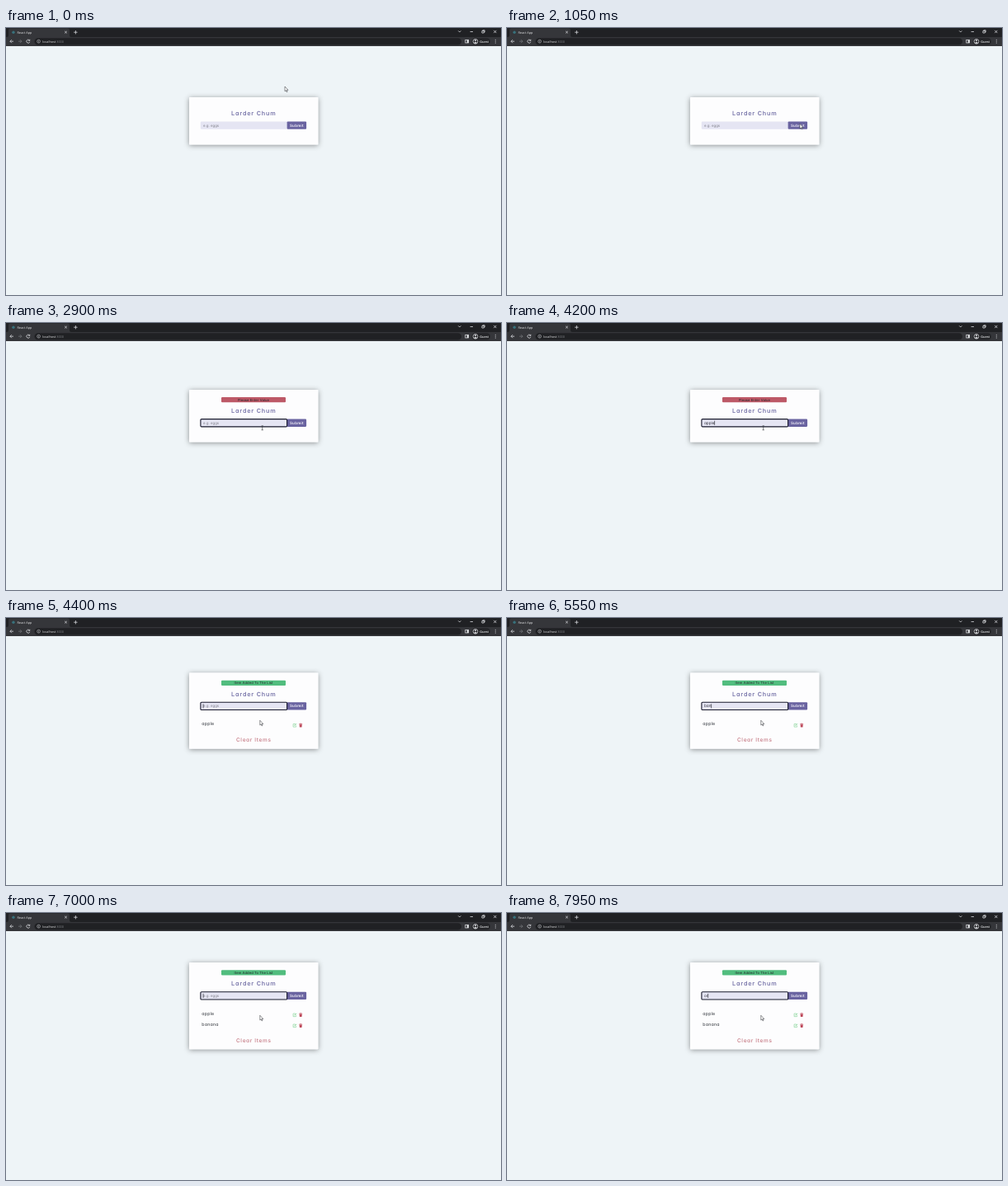
Write an HTML page that moves like this. It is 600 px wide and 324 px high and loops after 8 s.

```html
<!DOCTYPE html>
<html lang="en">
<head>
<meta charset="utf-8">
<title>Grocery list</title>
<style>
  html, body { margin: 0; width: 100%; height: 100%; overflow: hidden; background: #eef4f7; }
  svg { display: block; width: 100vw; height: 100vh; }
  text { font-family: Inter, "Open Sans", sans-serif; font-feature-settings: "cv11"; text-rendering: geometricPrecision; white-space: pre; }
  .chrome text { font-family: "Open Sans", "Noto Sans", sans-serif; font-size: 3.8px; fill: #e4e5e7; }
  .line { fill: none; stroke: #dfe1e4; stroke-width: .75; }
  .mid { text-anchor: middle; }
  .title { font-size: 7.2px; font-weight: 600; letter-spacing: .85px; fill: #7774a9; }
  .notice { font-size: 4.1px; letter-spacing: .1px; fill: #23272b; }
  .submit { font-size: 4.5px; font-weight: 600; letter-spacing: .28px; fill: #f4f3fa; }
  .item { font-size: 5.3px; letter-spacing: .2px; fill: #34383f; }
  .clear { font-size: 6.5px; font-weight: 500; letter-spacing: .65px; fill: #c57984; }
</style>
</head>
<body>
<svg viewBox="0 0 600 324">
  <defs>
    <filter id="shadow" x="-10%" y="-25%" width="120%" height="150%">
      <feDropShadow dx="0" dy="1" stdDeviation="3" flood-color="#000" flood-opacity=".42"/>
    </filter>
    <g id="icons">
      <path d="M351 -1.6H348.1V2H351.6V.3" fill="none" stroke="#9bdcaa" stroke-width=".8"/>
      <path d="M349.5 .7L352 -1.8" stroke="#74cb88" stroke-width=".9"/>
      <path d="M355.2 -1.5H359.2M356.5 -2H357.9" stroke="#bd4759" stroke-width=".7"/>
      <path d="M355.6 -.9H358.8L358.5 2.3H355.9Z" fill="#bd4759"/>
    </g>
  </defs>
  <rect width="600" height="324" fill="#eef4f7"/>

  <g class="chrome">
    <rect width="600" height="12" fill="#202124"/>
    <path d="M1 11Q3 11 3 9V2.5Q3 .5 5 .5H75Q77 .5 77 2.5V9Q77 11 79 11H600V22H0V11Z" fill="#35363a"/>
    <circle cx="9" cy="5.2" r="1.7" fill="#38717c"/>
    <text x="13.5" y="6.7">React App</text>
    <path class="line" d="M71.2 3.8L73.8 6.4M73.8 3.8L71.2 6.4M82.2 5.2H86.6M84.4 3V7.4"/>
    <path class="line" d="M548.2 3.4L549.8 5L551.4 3.4M562.6 4.5H566M591.2 2.9L594.4 6.1M594.4 2.9L591.2 6.1"/>
    <path class="line" d="M576.9 3.6H579.3V6H576.9ZM577.8 3.4V2.7H580.2V5.1H579.5"/>
    <path class="line" d="M9 16.2H4.9M6.9 14.2L4.9 16.2L6.9 18.2"/>
    <path class="line" d="M15 16.2H19M17 14.2L19 16.2L17 18.2" style="stroke:#77797d"/>
    <path class="line" d="M28.4 14.9A2 2 0 1 0 28.8 16.8M28.8 13.8V15.4H27.2"/>
    <rect x="34.5" y="12.2" width="517.5" height="8.4" rx="4.2" fill="#202124"/>
    <circle class="line" cx="39.6" cy="16.2" r="1.9" style="stroke-width:.5"/>
    <path class="line" d="M39.6 15.9V17.3M39.6 15V15.4" style="stroke-width:.5"/>
    <text x="44.3" y="17.7">localhost<tspan fill="#85888c">:3000</tspan></text>
    <rect class="line" x="556.8" y="14.4" width="3.8" height="3.6"/>
    <rect x="558.8" y="14.4" width="2" height="3.6" fill="#dfe1e4"/>
    <rect x="564.5" y="12.2" width="22.5" height="8.4" rx="4.2" fill="#242528"/>
    <circle class="line" cx="569" cy="16.3" r="2.9"/>
    <circle cx="569" cy="15.3" r="1" fill="#dfe1e4"/>
    <path d="M567.1 18Q569 16.1 570.9 18Q569 19.7 567.1 18Z" fill="#dfe1e4"/>
    <text x="574.3" y="17.6" font-weight="600">Guest</text>
    <path d="M593.3 14.3v.01M593.3 16.2v.01M593.3 18.1v.01" stroke="#dfe1e4" stroke-linecap="round"/>
  </g>

  <rect id="card" x="222" width="156.3" rx=".8" fill="#fdfdfe" filter="url(#shadow)"/>
  <g id="notice">
    <rect id="noticeBar" x="261" width="78" height="6.3" y="-3.15" rx="1.1"/>
    <text id="noticeText" class="notice mid" x="300" y="1.45"></text>
  </g>
  <text id="title" class="title mid" x="300.4">Larder Chum</text>
  <g id="form">
    <path d="M340.6 0H237A1.2 1.2 0 0 0 235.8 1.2V8.1A1.2 1.2 0 0 0 237 9.3H340.6Z" fill="#e5e5f3"/>
    <rect x="340.6" width="23.5" height="9.3" rx="1.1" fill="#6963a0"/>
    <text class="submit mid" x="352.4" y="6.2">Submit</text>
    <rect id="focus" x="235.9" y="0" width="104.7" height="9.3" rx="1.1" fill="none" stroke="#17182b" stroke-width="1.1"/>
    <text id="field" x="238.9" y="6.1"></text>
    <path id="caret" d="M0 2.1V7.2" stroke="#22222c" stroke-width=".65"/>
  </g>
  <g id="rows"></g>
  <text id="clear" class="clear mid" x="300.3">Clear Items</text>

  <path id="arrow" d="M0 0V5.8L1.3 4.6L2.2 6.7L3.1 6.3L2.2 4.3H4Z" fill="#fff" stroke="#22252a" stroke-width=".5"/>
  <path id="beam" d="M-1.2 -2.5H1.2M0 -2.5V2.5M-1.2 2.5H1.2" fill="none" stroke="#33363b" stroke-width=".6"/>
</svg>
<script>
const LOOP = 8000, MIDDLE = 112.7;
const EMPTY_AT = 1300, FOCUS_AT = 2300, SUBMITS = [4250, 6700];
const items = ["apple", "banana"];
const entries = [
  { from: 0, text: "apple", keys: [3200, 3450, 3800, 4000, 4150] },
  { from: SUBMITS[0], text: "banana", keys: [5100, 5300, 5450, 5650, 5850, 6000] },
  { from: SUBMITS[1], text: "or", keys: [7600, 7850] }
];
// time, x, y of the pointer; eased between stops
const pointer = [
  [0, 338, 71], [850, 357, 119], [900, 357, 119], [1050, 355, 116.3],
  [1850, 355, 116.3], [2250, 310.7, 127.3], [4249, 310.7, 127.3], [4250, 307.8, 124.2]
];

const $ = id => document.getElementById(id);
const show = (el, on) => el.setAttribute("visibility", on ? "visible" : "hidden");
const moveTo = (el, x, y) => el.setAttribute("transform", `translate(${x} ${y})`);

const rows = items.map(name => {
  const row = document.createElementNS("http://www.w3.org/2000/svg", "g");
  row.innerHTML = `<text class="item" x="237.3" y="1.6">${name}</text><use href="#icons" y="1.6"/>`;
  return $("rows").appendChild(row);
});

function pointerAt(t) {
  const next = pointer.findIndex(stop => stop[0] > t);
  if (next < 0) return pointer.at(-1).slice(1);
  const [t0, x0, y0] = pointer[next - 1], [t1, x1, y1] = pointer[next];
  const p = (t - t0) / (t1 - t0), e = p * p * (3 - 2 * p);
  return [x0 + (x1 - x0) * e, y0 + (y1 - y0) * e];
}

function drawForm(t, y) {
  const entry = entries.findLast(e => t >= e.from);
  const typed = entry.keys.filter(k => t >= k);
  const value = entry.text.slice(0, typed.length);
  const field = $("field"), focused = t >= FOCUS_AT;
  moveTo($("form"), 0, y);
  field.textContent = value || "e.g. eggs";
  field.setAttribute("font-size", value ? 4.7 : 4.4);
  field.setAttribute("fill", value ? "#34343f" : "#85858f");
  show($("focus"), focused);
  const lastAction = Math.max(FOCUS_AT, entry.from, ...typed);
  show($("caret"), focused && (t - lastAction) % 1000 < 500);
  moveTo($("caret"), 239.1 + (value ? field.getComputedTextLength() : 0), 0);
}

function draw(t) {
  const count = SUBMITS.filter(s => t >= s).length;
  const alert = t >= EMPTY_AT;
  const height = (alert ? 63.6 : 57.5) + (count ? 15.7 + 13 * count : 0);
  const top = MIDDLE - height / 2, shift = alert ? 6.2 : 0;

  $("card").setAttribute("y", top);
  $("card").setAttribute("height", height);
  show($("notice"), alert);
  moveTo($("notice"), 0, top + 12.3);
  $("noticeBar").setAttribute("fill", count ? "#51bd7e" : "#bd5967");
  $("noticeText").textContent = count ? "Item Added To The List" : "Please Enter Value";
  $("title").setAttribute("y", top + 21.9 + shift);
  drawForm(t, top + 29.5 + shift);
  rows.forEach((row, i) => {
    show(row, i < count);
    moveTo(row, 0, top + 62 + 13 * i);
  });
  show($("clear"), count > 0);
  $("clear").setAttribute("y", top + 70.9 + 13 * count);

  const [x, y] = pointerAt(t);
  const overField = t >= 2050 && t < SUBMITS[0];
  show($("arrow"), !overField);
  show($("beam"), overField);
  moveTo($("arrow"), x, y);
  moveTo($("beam"), x, y);
}

const start = performance.now();
function tick(now) {
  draw(Math.max(0, now - start) % LOOP);
  requestAnimationFrame(tick);
}
draw(0);
requestAnimationFrame(tick);
</script>
</body>
</html>
```
